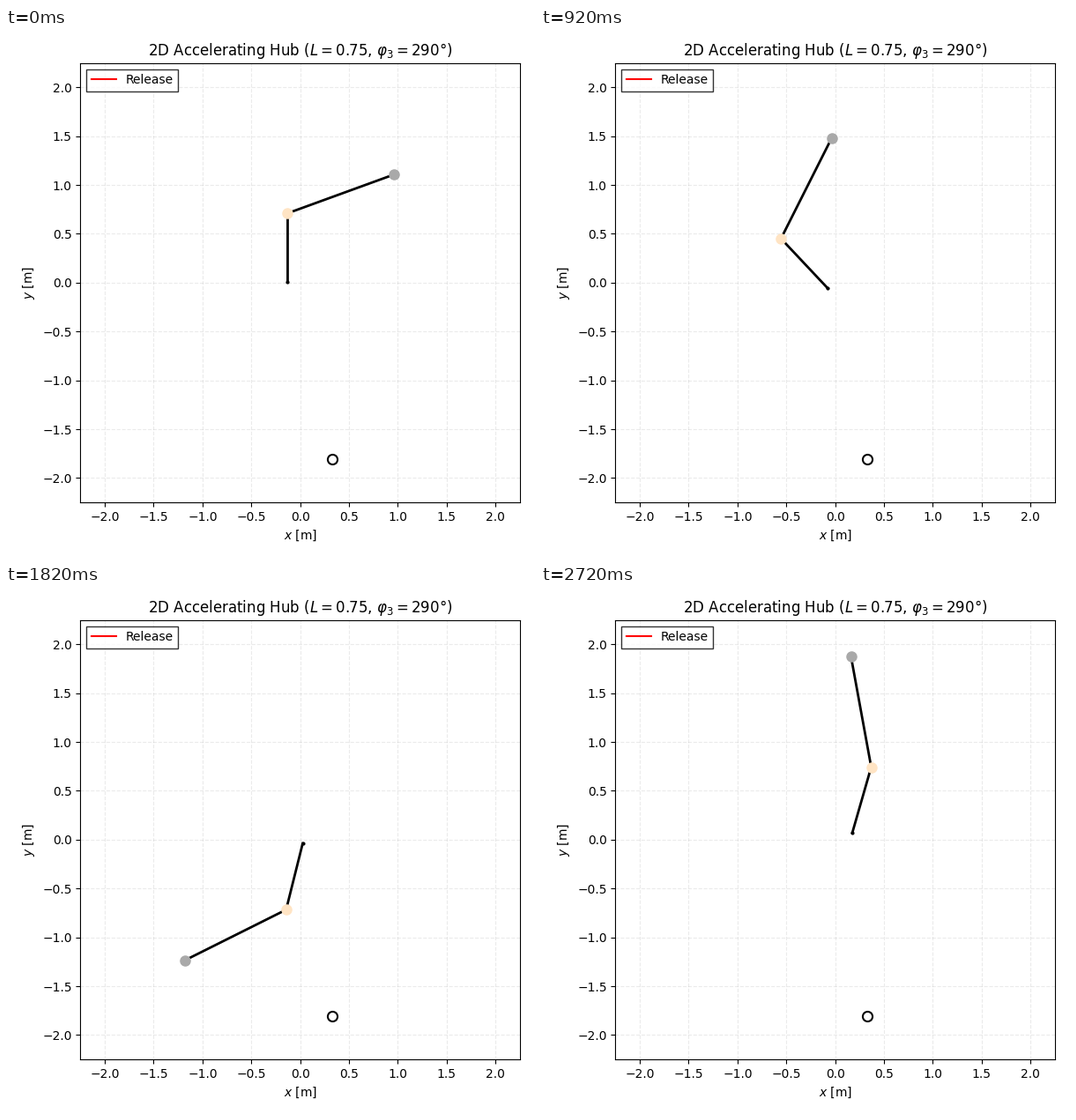
A matplotlib script that plays this animation: 600 by 600 pixels, repeating every 2740 ms.

```python
import numpy as np
import matplotlib.pyplot as plt
from matplotlib.animation import FuncAnimation

FRAMES, STEP = 137, 20
ARM, ROD = 0.70, 1.156
LOCK = -70.0


def clamped_spline(ts, ys, end_slope):
    """Cubic spline through (ts, ys), flat at its start."""
    ts, ys = np.array(ts), np.array(ys)
    n = len(ts)
    h = np.diff(ts)
    d = np.diff(ys) / h
    a, b = np.eye(n), np.zeros(n)
    b[-1] = end_slope
    for i in range(1, n - 1):
        a[i, i - 1:i + 2] = h[i], 2 * (h[i - 1] + h[i]), h[i - 1]
        b[i] = 3 * (h[i] * d[i - 1] + h[i - 1] * d[i])
    m = np.linalg.solve(a, b)

    def value(t):
        t = min(max(t, ts[0]), ts[-1])
        i = min(np.searchsorted(ts, t, side="right") - 1, n - 2)
        u = (t - ts[i]) / h[i]
        return (ys[i] * (1 + 2 * u) * (1 - u) ** 2
                + ys[i + 1] * u * u * (3 - 2 * u)
                + h[i] * u * (1 - u) * (m[i] * (1 - u) - m[i + 1] * u))

    return value


# Lag of the arm behind constant acceleration, and the hinge angle after unlocking
lag = clamped_spline([1.2, 1.82, 2.1, 2.46, 2.72],
                     [0, -3.3, -11.1, -25.7, -34.1], -23)
hinge = clamped_spline([1.1, 1.62, 1.82, 2.1, 2.46, 2.72],
                       [LOCK, -63.2, -49.4, -21.2, 16.9, 26.4], -15)


def direction(deg):
    a = np.radians(deg)
    return np.array([np.cos(a), np.sin(a)])


def pose(t):
    """Hub, elbow and mass positions at time t in seconds."""
    hub = np.array([-0.128 + 0.03 * t + 0.03 * t * t,
                    0.011 - 0.1255 * t + 0.0542 * t * t])
    arm = 90 + 51.1 * t * t + lag(t)
    elbow = hub + ARM * direction(arm)
    return hub, elbow, elbow + ROD * direction(arm + hinge(t))


fig = plt.figure(figsize=(6, 6), dpi=100)
ax = fig.add_axes([84.4 / 600, 61.9 / 600, 498.5 / 600, 498.5 / 600])
ax.set(xlim=(-2.25, 2.25), ylim=(-2.25, 2.25),
       xlabel="$x$ [m]", ylabel="$y$ [m]")
ticks = np.arange(-2, 2.1, 0.5)
ax.set_xticks(ticks)
ax.set_yticks(ticks)
ax.set_title(r"2D Accelerating Hub ($L=0.75$, $\varphi_3=290$°)")
ax.grid(linestyle="--", alpha=0.25)

ax.plot([], [], color="red", label="Release")
ax.legend(loc="upper left", fancybox=False, edgecolor="black")

ax.plot(0.324, -1.811, "o", ms=8, mfc="none", mec="black", mew=1.5)
links, = ax.plot([], [], color="black", lw=2)
dots = [ax.plot([], [], "o", color=c, ms=s)[0]
        for c, s in (("black", 2), ("bisque", 8), ("darkgray", 8))]


def update(i):
    points = pose(i * STEP / 1000)
    links.set_data(*zip(*points))
    for dot, (x, y) in zip(dots, points):
        dot.set_data([x], [y])
    return [links, *dots]


anim = FuncAnimation(fig, update, frames=FRAMES, interval=STEP,
                     repeat=True, repeat_delay=0)
plt.show()
```
